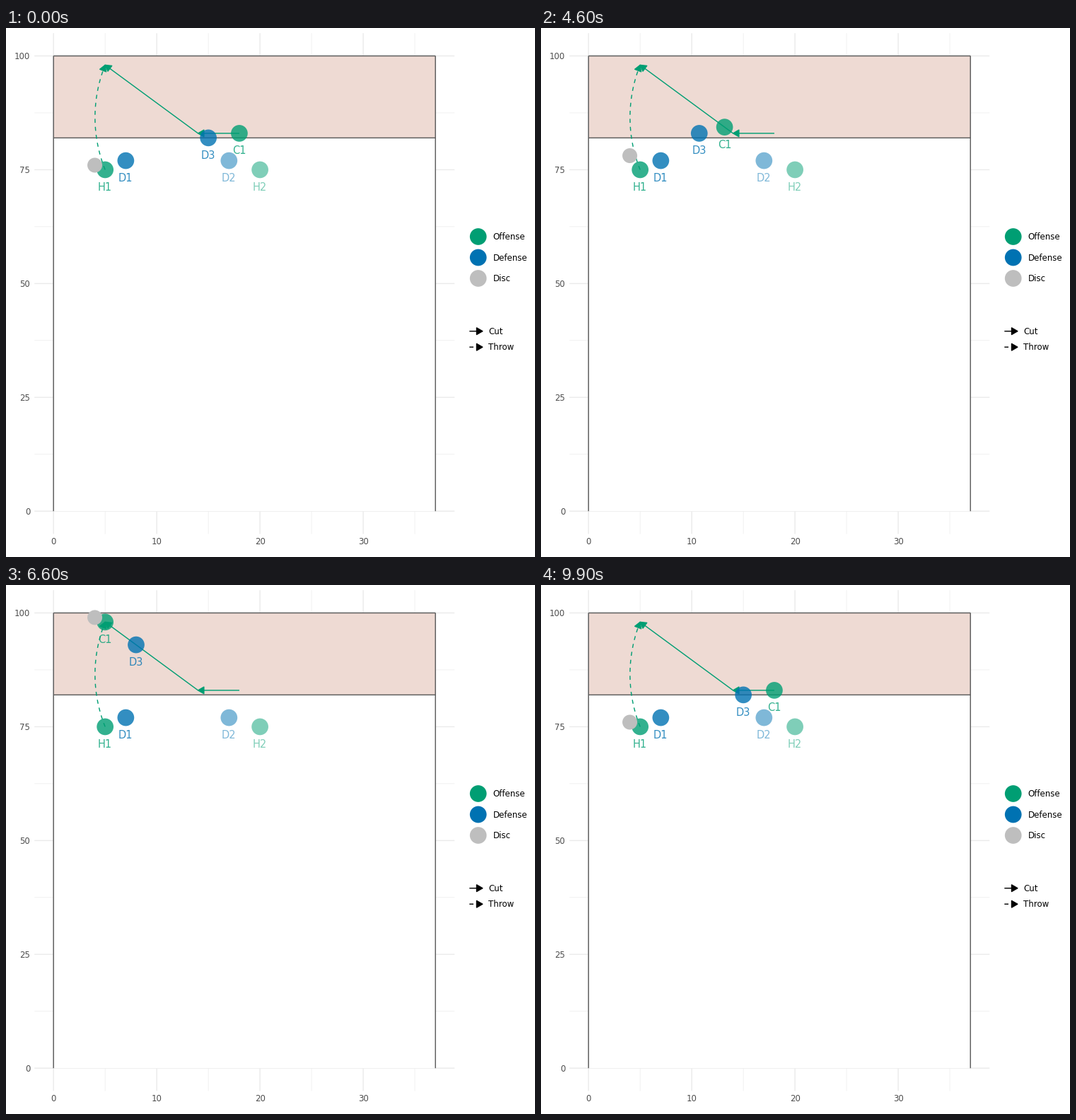
These frames come from a looping animation (748x748 px, 10 s). A matplotlib script:

```python
import matplotlib.pyplot as plt
import numpy as np
from matplotlib.animation import FuncAnimation
from matplotlib.patches import Circle, Polygon, Rectangle

SIZE, DPI = 748, 100
FRAMES, INTERVAL = 100, 100
PT = 72 / DPI  # points per pixel

GREEN, BLUE, GREY = "#009E73", "#0072B2", "#BEBEBE"
GRID, EDGE, ZONE = "#EBEBEB", "#595959", "#EEDAD3"
LINE = 1.42
R_PLAYER, R_DISC = 11.85, 10.5
LABEL_DROP = 29.5

plt.rcParams["font.family"] = "DejaVu Sans"
fig = plt.figure(figsize=(SIZE / DPI, SIZE / DPI), dpi=DPI, facecolor="white")
ax = fig.add_axes([0, 0, 1, 1])
ax.set(xlim=(0, SIZE), ylim=(SIZE, 0))
ax.axis("off")


def px(x, y):
    """Field coordinates to stage pixels."""
    return 67.2 + 14.595 * x, 683.2 - 6.437 * y


def line(xs, ys, color, width=LINE, z=1, **kw):
    ax.plot(xs, ys, color=color, lw=width * PT, zorder=z,
            solid_capstyle="butt", dash_capstyle="butt", snap=False, **kw)


def text(x, y, s, size, color, **kw):
    return ax.text(x, y, s, fontsize=size * PT, color=color, va="baseline", **kw)


def head(tip, angle, color, z=3, length=9.6):
    """Closed arrow head whose edges open 30 degrees either side."""
    back = angle + np.pi + np.radians([-30, 30])
    wings = np.array(tip) + length * np.column_stack([np.cos(back), np.sin(back)])
    ax.add_patch(Polygon([wings[0], tip, wings[1]], fc=color, ec=color,
                         lw=LINE * PT, joinstyle="round", zorder=z))


def arrow(xs, ys, color, **kw):
    line(xs, ys, color, z=3, **kw)
    head((xs[-1], ys[-1]), np.arctan2(ys[-1] - ys[-2], xs[-1] - xs[-2]), color)


def box(x0, y0, x1, y1, color, z):
    (left, bottom), (right, top) = px(x0, y0), px(x1, y1)
    ax.add_patch(Rectangle((left, top), right - left, bottom - top,
                           fc=color, ec="none", zorder=z, snap=False))


def draw_grid():
    (left, bottom), (right, top) = px(-1.85, -5), px(38.85, 105)
    for i in range(8):
        x = px(5 * i, 0)[0]
        line([x, x], [top, bottom], GRID, LINE / (1 + i % 2))
        if i % 2 == 0:
            text(x, 730.2, str(5 * i), 11.73, "#4D4D4D", ha="center")
    for i in range(9):
        y = px(0, 12.5 * i)[1]
        line([left, right], [y, y], GRID, LINE / (1 + i % 2))
        if i % 2 == 0:
            text(34.3, y + 4.3, str(25 * i // 2), 11.73, "#4D4D4D", ha="right")


def draw_field():
    box(0, 0, 37, 100, "white", 1.5)
    box(0, 82, 37, 100, ZONE, 1.6)
    for a, b in [((0, 0), (0, 100)), ((37, 0), (37, 100)),
                 ((0, 100), (37, 100)), ((0, 82), (37, 82))]:
        line(*zip(px(*a), px(*b)), EDGE, z=2)


def draw_routes():
    for a, b in [((18, 83), (14, 83)), ((14, 83), (5, 98))]:
        arrow(*zip(px(*a), px(*b)), GREEN)
    # Throw: shallow circular arc bulging left
    (x, y0), (_, y1) = px(5, 75), px(5, 98)
    half, sag = (y0 - y1) / 2, 14.3
    radius = (half**2 + sag**2) / (2 * sag)
    t = np.linspace(-1, 1, 60) * np.arcsin(half / radius)
    arrow(x + radius - sag - radius * np.cos(t),
          (y0 + y1) / 2 - radius * np.sin(t), GREEN, dashes=(4, 4))


def draw_legend():
    for y, name, color in [(295, "Offense", GREEN), (324.5, "Defense", BLUE),
                           (354, "Disc", GREY)]:
        ax.add_patch(Circle((667.7, y), R_PLAYER, fc=color, ec="none"))
        text(688.8, y + 4.3, name, 11.73, "black")
    for y, name, kw in [(428.7, "Cut", {}), (451.2, "Throw", {"dashes": (4, 4)})]:
        arrow([655.3, 673.8], [y, y], "black", **kw)
        text(682.2, y + 4.1, name, 11.73, "black")


class Player:
    def __init__(self, name, pos, color, z, alpha=0.8):
        self.dot = ax.add_patch(Circle((0, 0), R_PLAYER, fc=color, ec="none",
                                       alpha=alpha, zorder=z))
        self.label = text(0, 0, name, 14.66, color, ha="center",
                          alpha=alpha, zorder=z + 1)
        self.move(pos)

    def move(self, pos):
        x, y = px(*pos)
        self.dot.set_center((x, y))
        self.label.set_position((x, y + LABEL_DROP))


draw_grid()
draw_field()
draw_routes()
draw_legend()

Player("H1", (5, 75), GREEN, 4)
Player("H2", (20, 75), GREEN, 4, 0.5)
Player("D1", (7, 77), BLUE, 6)
Player("D2", (17, 77), BLUE, 6, 0.5)
cutter = Player("C1", (18, 83), GREEN, 4)
marker = Player("D3", (15, 82), BLUE, 6)
disc = ax.add_patch(Circle(px(4, 76), R_DISC, fc=GREY, ec="none", zorder=8))

# Rows: cutter, defender, disc
POSES = np.array([
    [(18, 83), (15, 82), (4, 76)],
    [(14, 83), (11, 82), (4, 76)],
    [(5, 98), (8, 93), (4, 99)],
], float)
# First moving frame, zero of the ramp, end of the ramp
LEGS = [(12, 11, 33), (46, 44, 66), (79, 78, 99)]


def pose(frame):
    for i, (first, zero, end) in enumerate(LEGS):
        if frame < first:
            return POSES[i]
        if frame <= end:
            p = (frame - zero) / (end - zero)
            return POSES[i] + p * (POSES[(i + 1) % 3] - POSES[i])
    return POSES[0]


def update(frame):
    c, d, o = pose(frame)
    cutter.move(c)
    marker.move(d)
    disc.set_center(px(*o))
    return cutter.dot, cutter.label, marker.dot, marker.label, disc


anim = FuncAnimation(fig, update, frames=FRAMES, interval=INTERVAL,
                     repeat=True, repeat_delay=0, blit=False)
plt.show()
```
